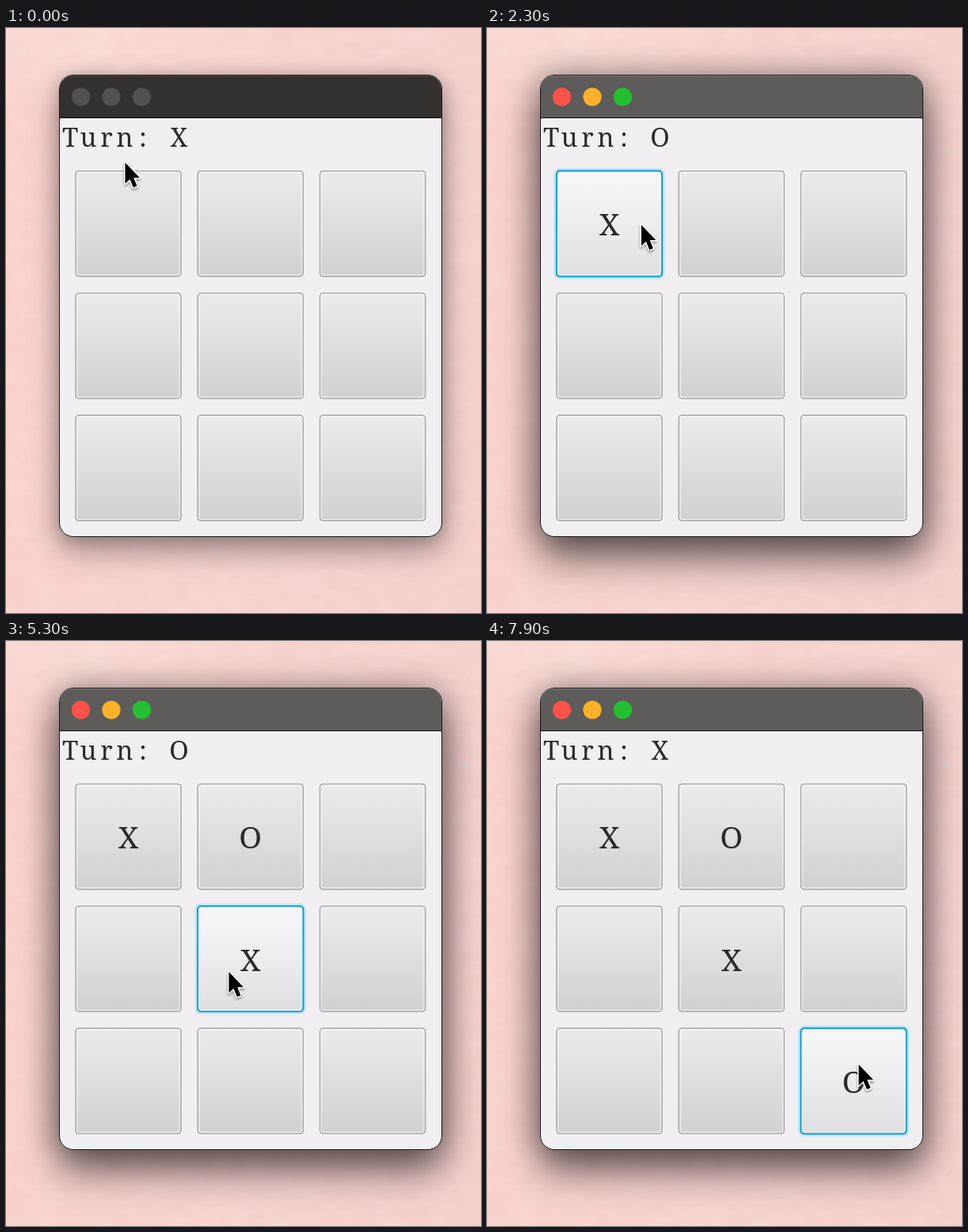
These frames come from a looping animation (600 by 739 pixels, 8 s). An HTML page:

```html
<!DOCTYPE html>
<html lang="en">
<head>
<meta charset="utf-8">
<title>Tic-tac-toe</title>
<style>
  html, body { margin: 0; width: 100%; height: 100%; overflow: hidden; }
  body {
    position: relative;
    background:
      radial-gradient(ellipse 260px 90px at 90px 25px, rgba(246, 222, 215, .7), transparent),
      linear-gradient(100deg, #fad0ca, #f6d2ce 60%, #f5cfcb);
  }
  svg { position: absolute; left: 0; top: 0; display: block; }
  #win {
    position: absolute; left: 67px; top: 59px; width: 484px; height: 584px;
    box-sizing: border-box; border: 1px solid #191716; border-radius: 18px;
    overflow: hidden; background: #f1eff2;
    box-shadow: 0 16px 38px rgba(0, 0, 0, .4), 0 0 18px rgba(0, 0, 0, .16);
  }
  #bar {
    height: 54px; box-sizing: border-box; background: #33302e;
    border-top: 1px solid #56524f; border-bottom: 1.5px solid #0d0c0c;
  }
  .active #win { box-shadow: 0 26px 50px rgba(0, 0, 0, .56), 0 0 40px rgba(0, 0, 0, .34); }
  .active #bar { background: #5d5c5a; border-top-color: #83817f; }
  .light { fill: #52514f; }
  .active .light { fill: var(--c); }
  .face { fill: url(#idle); stroke: #a5a4a6; stroke-width: 1.5; }
  .edge { fill: none; stroke: #fff; stroke-opacity: .6; stroke-width: 1.5; }
  .glow { fill: none; stroke: #6fd0ef; stroke-opacity: .4; stroke-width: 5; display: none; }
  .hover .face { fill: url(#hover); }
  .armed .face { fill: url(#armed); }
  .armed .edge { stroke-opacity: .15; }
  .focus .face { stroke: #0b9fd2; stroke-width: 2.2; }
  .focus .glow { display: inline; }
  text { font-family: "Noto Serif", "Liberation Serif", serif; font-weight: 200; fill: #2b2a2c; text-anchor: middle; }
</style>
</head>
<body>
<svg width="600" height="739">
  <filter id="paper" x="0" y="0" width="100%" height="100%">
    <feTurbulence type="fractalNoise" baseFrequency=".03 .06" numOctaves="3" seed="4"/>
    <feColorMatrix values="0 0 0 0 1  0 0 0 0 .93  0 0 0 0 .9  .5 0 0 0 -.14"/>
  </filter>
  <rect width="600" height="739" filter="url(#paper)" opacity=".5"/>
  <ellipse cx="579" cy="157" rx="5" ry="2.5" fill="#e3dcde" opacity=".7"/>
</svg>
<div id="win"><div id="bar"></div></div>
<svg width="600" height="739">
  <defs>
    <linearGradient id="idle" x2="0" y2="1">
      <stop stop-color="#ecebec"/><stop offset=".45" stop-color="#e1e0e1"/><stop offset="1" stop-color="#d0cfd1"/>
    </linearGradient>
    <linearGradient id="hover" x2="0" y2="1">
      <stop stop-color="#f8f7f8"/><stop offset=".45" stop-color="#eeedef"/><stop offset="1" stop-color="#dfdee0"/>
    </linearGradient>
    <linearGradient id="armed" x2="0" y2="1">
      <stop stop-color="#d1d0d2"/><stop offset="1" stop-color="#c1c0c2"/>
    </linearGradient>
    <filter id="drop" x="-50%" y="-50%" width="200%" height="200%">
      <feDropShadow dx="0" dy="2" stdDeviation="1.6" flood-opacity=".4"/>
    </filter>
  </defs>
  <g id="lights"></g>
  <text id="turn" y="150" font-size="33" x="81 104 127 150 173 196 218.5"></text>
  <g id="board"></g>
  <circle id="ring" r="42" fill="none" stroke="#000" stroke-width="2.8"/>
  <path id="cursor" d="M0 0V26.5L6 21L10.3 31.5L15 29.5L10.7 19.3H18.5Z" fill="#000"
    stroke="#fff" stroke-width="3" stroke-linejoin="round" paint-order="stroke" filter="url(#drop)"/>
</svg>
<script>
  const LOOP = 8000, STEP = 100, ACTIVATE = 600;
  const $ = id => document.getElementById(id);

  // Cursor tip: time, x, y
  const path = [
    [0, 150, 169], [100, 150, 171], [500, 140, 241], [2000, 140, 241],
    [2800, 312, 262], [3100, 316, 258], [3500, 314, 258], [4200, 314, 258],
    [4800, 281, 417], [5500, 281, 417], [6600, 469, 534], [8000, 469, 534]
  ];
  // Each click: ring shown, button armed, mark placed
  const moves = [
    { cell: 0, press: 1700, arm: 1800, done: 1900, mark: "X" },
    { cell: 1, press: 3600, arm: 3700, done: 3800, mark: "O" },
    { cell: 4, press: 4900, arm: 5000, done: 5100, mark: "X" },
    { cell: 8, press: 6900, arm: 7000, done: 7100, mark: "O" }
  ];

  function add(parent, tag, attrs) {
    const el = document.createElementNS("http://www.w3.org/2000/svg", tag);
    for (const key in attrs) el.setAttribute(key, attrs[key]);
    return parent.appendChild(el);
  }

  ["#ff5249", "#ffb229", "#22c031"].forEach((color, i) =>
    add($("lights"), "circle", { class: "light", style: `--c:${color}`, cx: 94.5 + i * 38.5, cy: 87, r: 11.6 }));

  const cells = Array.from({ length: 9 }, (_, i) => {
    const x = 88 + (i % 3) * 154.3, y = 180.7 + Math.floor(i / 3) * 154.3;
    const g = add($("board"), "g");
    const box = (cls, inset, rx) => add(g, "rect", {
      class: cls, x: x + inset, y: y + inset, width: 133 - 2 * inset, height: 133 - 2 * inset, rx
    });
    box("glow", -1, 5);
    box("face", 0, 4);
    box("edge", 1.6, 3);
    const label = add(g, "text", { x: x + 66.5, y: y + 81.5, "font-size": 39 });
    return { g, label, x, y };
  });

  function cursorAt(t) {
    const i = path.findIndex(p => p[0] > t);
    const [t0, x0, y0] = path[i - 1], [t1, x1, y1] = path[i];
    const u = (t - t0) / (t1 - t0), k = u * u * (3 - 2 * u);
    return [x0 + (x1 - x0) * k, y0 + (y1 - y0) * k];
  }

  function draw(t) {
    const active = t >= ACTIVATE;
    const [x, y] = cursorAt(t);
    const placed = moves.filter(m => t >= m.done);
    const started = moves.filter(m => t >= m.press);
    const focus = started.length ? started[started.length - 1].cell : 0;
    const ring = (t >= 500 && t < 700) || moves.some(m => t >= m.press && t < m.done);

    document.body.classList.toggle("active", active);
    $("turn").textContent = "Turn: " + "XO"[placed.length % 2];
    cells.forEach((c, i) => {
      const over = x > c.x && x < c.x + 133 && y > c.y && y < c.y + 133;
      c.g.classList.toggle("hover", active && over);
      c.g.classList.toggle("focus", active && i === focus);
      c.g.classList.toggle("armed", moves.some(m => m.cell === i && t >= m.arm && t < m.done));
      const move = placed.find(m => m.cell === i);
      c.label.textContent = move ? move.mark : "";
    });
    $("ring").setAttribute("visibility", ring ? "visible" : "hidden");
    $("ring").setAttribute("transform", `translate(${x} ${y + 3})`);
    $("cursor").setAttribute("transform", `translate(${x + .5} ${y + 1})`);
  }

  const start = performance.now();
  function tick() {
    const t = (performance.now() - start) % LOOP;
    draw(Math.floor(t / STEP) * STEP);
    requestAnimationFrame(tick);
  }
  tick();
</script>
</body>
</html>
```
